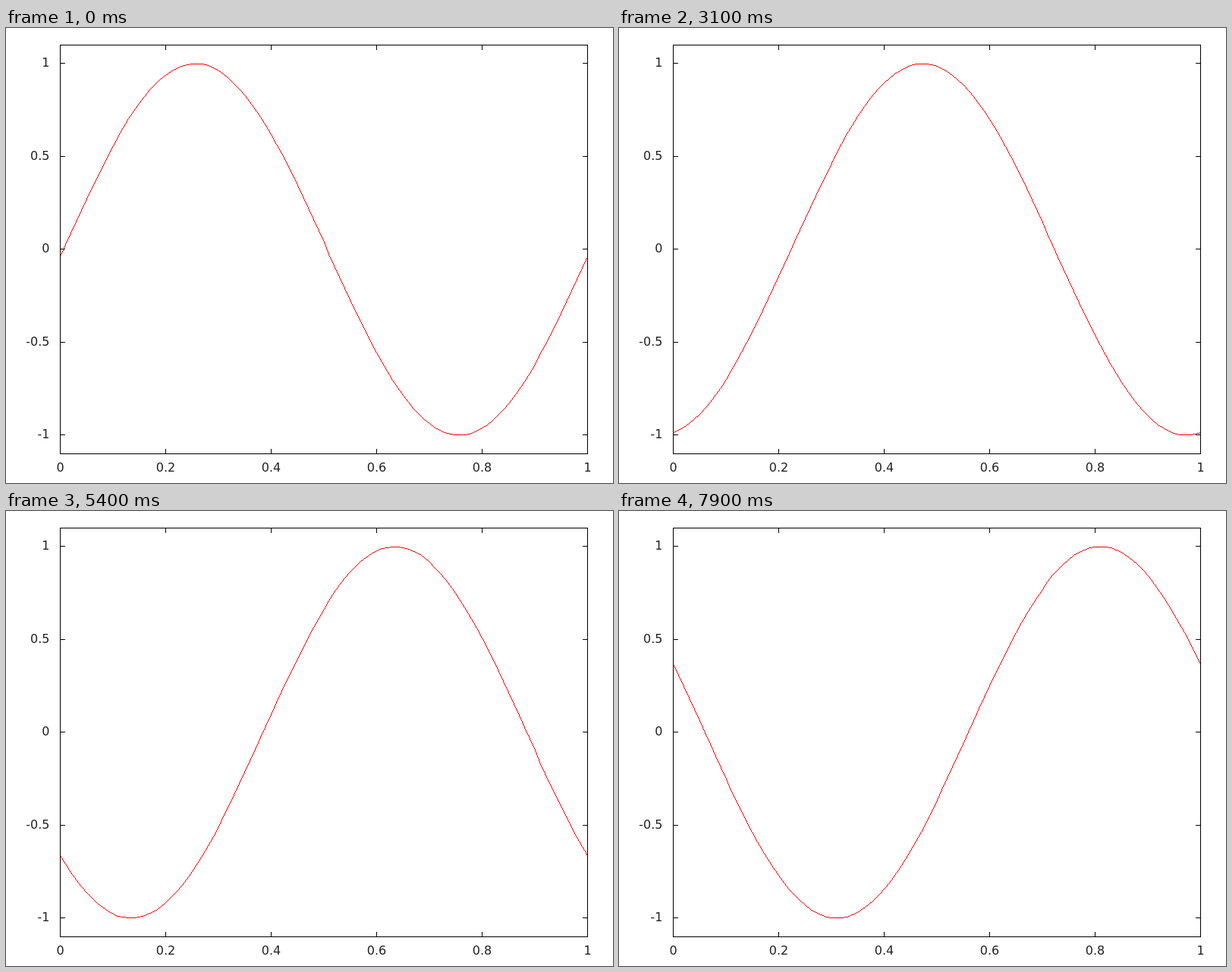
Recreate the animation shown at these times as an HTML page with a canvas. Size 800 by 600 pixels, loop 8 s.

```html
<!DOCTYPE html>
<html lang="en">
<head>
<meta charset="utf-8">
<title>Travelling sine wave</title>
<style>
  html, body { margin: 0; width: 100%; height: 100%; overflow: hidden; background: #fff; }
  canvas, svg { position: absolute; left: 0; top: 0; width: 800px; height: 600px; }
  path { fill: none; stroke: #000; stroke-width: 1; shape-rendering: crispEdges; }
  text { font: 16px "DejaVu Sans", sans-serif; fill: #222; }
</style>
</head>
<body>
<svg id="axes" viewBox="0 0 800 600"><path id="ticks"/></svg>
<canvas id="plot" width="800" height="600"></canvas>
<svg viewBox="0 0 800 600"><path d="M71.5 22.5H766.5V561.5H71.5Z"/></svg>
<script>
const LEFT = 71, RIGHT = 766, TOP = 22, BOTTOM = 561, TICK = 6;
const SAMPLES = 100, STEP_MS = 100, STEPS = 80;
const PHASE = 0.006, SHIFT = 0.00701; // in wavelengths

// Halves round away from the origin corner; the epsilon absorbs float error
const round = v => Math.floor(v + 0.5 + 1e-6);
const px = x => LEFT + round(x * (RIGHT - LEFT));
const py = y => BOTTOM - round((y + 1.1) / 2.2 * (BOTTOM - TOP));

const axes = document.getElementById('axes');
let ticks = '';

function label(str, x, y, anchor) {
  const el = document.createElementNS(axes.namespaceURI, 'text');
  el.setAttribute('x', x);
  el.setAttribute('y', y);
  el.setAttribute('text-anchor', anchor);
  el.textContent = str;
  axes.append(el);
}

for (const v of [0, 0.2, 0.4, 0.6, 0.8, 1]) {
  const x = px(v) + 0.5;
  ticks += `M${x} ${TOP}v${TICK + 1}M${x} ${BOTTOM + 1}v${-TICK - 1}`;
  label(v, x, 585, 'middle');
}
for (const v of [-1, -0.5, 0, 0.5, 1]) {
  const y = py(v) + 0.5;
  ticks += `M${LEFT} ${y}h${TICK + 1}M${RIGHT + 1} ${y}h${-TICK - 1}`;
  label(v, 57.5, py(v) + 5, 'end');
}
document.getElementById('ticks').setAttribute('d', ticks);

const ctx = document.getElementById('plot').getContext('2d');
ctx.fillStyle = '#f00';

// Hard-edged line, one pixel per step along its longer axis
function line(x0, y0, x1, y1) {
  const n = Math.max(Math.abs(x1 - x0), Math.abs(y1 - y0));
  for (let i = 0; i <= n; i++) {
    const k = i / n;
    ctx.fillRect(round(x0 + (x1 - x0) * k), round(y0 + (y1 - y0) * k), 1, 1);
  }
}

function draw(step) {
  const shift = PHASE + SHIFT * step;
  const wave = x => py(Math.sin(2 * Math.PI * (x - shift)));
  ctx.clearRect(0, 0, 800, 600);
  for (let i = 0; i < SAMPLES; i++) {
    const a = i / SAMPLES, b = (i + 1) / SAMPLES;
    line(px(a), wave(a), px(b), wave(b));
  }
}

const start = performance.now();
let shown = -1;

function tick() {
  const step = Math.floor((performance.now() - start) / STEP_MS) % STEPS;
  if (step !== shown) draw(shown = step);
  requestAnimationFrame(tick);
}
tick();
</script>
</body>
</html>
```
